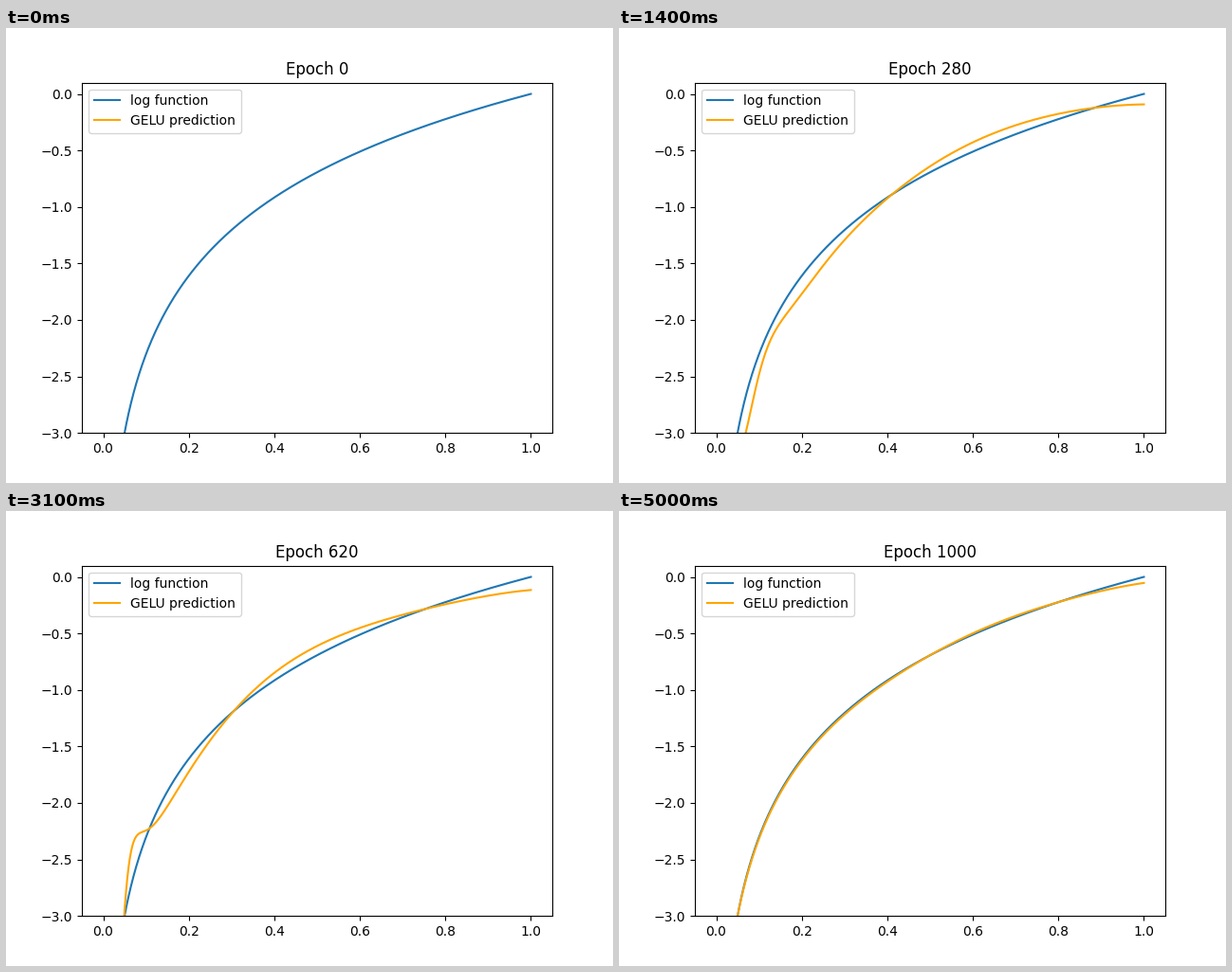
Write a matplotlib script that moves like this. It is 640 px wide and 480 px high and loops after 5050 ms.

```python
import math

import numpy as np
import matplotlib.pyplot as plt
from matplotlib.animation import FuncAnimation

FRAMES, INTERVAL, STEP = 101, 50, 10
BENT, WAVY = 17, 39  # frames where the two-hinge and the wavy stage begin

# Wave stage: zero crossings in u = -log(x), then base height and growth
WAVE_FRAMES = np.array([39, 48, 62, 83, 100])
WAVE_KEYS = np.array([
    [0.189, 0.887, 1.704, 2.375, 0.070, 0.28],
    [0.217, 0.968, 1.904, 2.674, 0.078, 0.29],
    [0.272, 1.187, 2.226, 3.030, 0.080, 0.34],
    [0.168, 0.700, 2.800, 3.400, 0.019, 0.12],
    [0.168, 0.700, 3.000, 3.600, 0.014, 0.00],
])

x = np.linspace(0.001, 1, 1000)
u = -np.log(x)
erf = np.vectorize(math.erf)


def smoothstep(s):
    s = min(max(s, 0), 1)
    return s * s * (3 - 2 * s)


def mix(a, b, w):
    return (1 - w) * a + w * b


def hermite(t, v, q):
    """Smooth curve through the values v at the knots t, read at q."""
    m = np.gradient(v, t, axis=0)
    i = np.clip(np.searchsorted(t, q, side="right") - 1, 0, len(t) - 2)
    h = t[i + 1] - t[i]
    s = (q - t[i]) / h
    return ((1 + 2 * s) * (1 - s) ** 2 * v[i] + s * (1 - s) ** 2 * h * m[i]
            + s * s * (3 - 2 * s) * v[i + 1] + s * s * (s - 1) * h * m[i + 1])


def gelu(z, width):
    return z * (1 + erf(z / width / math.sqrt(2))) / 2


def softplus(z, width):
    return width * np.log1p(np.exp(z / width))


def tilting_line(n):
    level = -1 + 1.3 * np.exp(-n / 3)
    return level + 1.7 * min(n / 8, 1) * (x - 0.5)


def log_with_wave(n):
    """Log curve plus an error wave that grows towards zero and fades out."""
    *zeros, base, growth = hermite(WAVE_FRAMES, WAVE_KEYS, n)
    zeros = np.array(zeros)
    reach = np.minimum(u, 1.5 * zeros[3] - 0.5 * zeros[2])
    phase = hermite(zeros, np.arange(4.0), reach)
    power = 2 + 4 * smoothstep((n - 48) / 35)
    height = base + growth * (reach / 3) ** power
    edge = (0.07 - 0.00028 * n) * x ** 10
    return height * np.sin(np.pi * phase) - edge - u


bent = -0.195 - 2.4 * gelu(0.74 - x, 0.3) - 7.2 * softplus(0.241 - x, 0.05)


def prediction(n):
    if n < BENT:
        return mix(tilting_line(n), bent, smoothstep(n / BENT))
    if n < WAVY:
        return mix(bent, log_with_wave(WAVY), (n - BENT) / (WAVY - BENT))
    return log_with_wave(n)


fig, ax = plt.subplots(figsize=(6.4, 4.8), dpi=100)
ax.plot(x, -u, label="log function")
line, = ax.plot(x, prediction(0), color="orange", label="GELU prediction")
ax.set_xlim(-0.05, 1.05)
ax.set_ylim(-3, 0.1)
title = ax.set_title("Epoch 0")
ax.legend(loc="best")


def update(n):
    line.set_ydata(prediction(n))
    title.set_text(f"Epoch {n * STEP}")
    return line, title


anim = FuncAnimation(fig, update, frames=FRAMES, interval=INTERVAL,
                     repeat=True, repeat_delay=0, blit=False)
plt.show()
```
